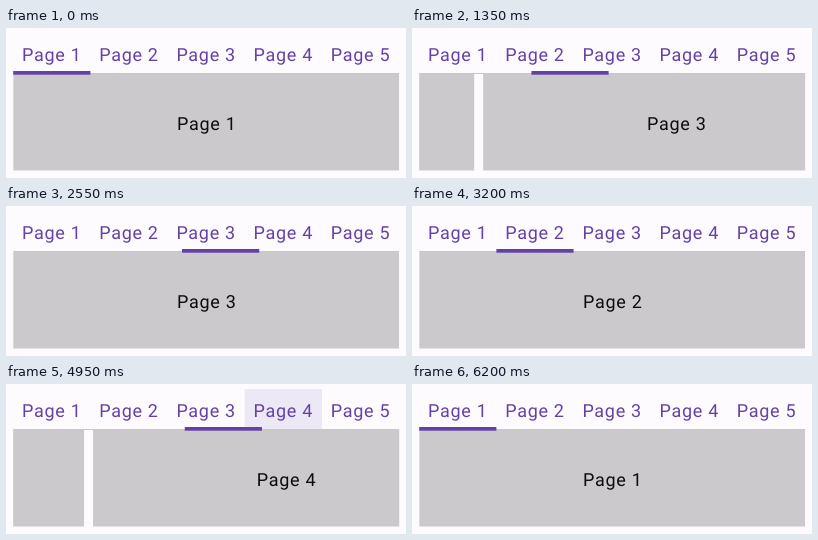
These frames come from a looping animation (400x150 px, 6500 ms). An HTML page:

```html
<!DOCTYPE html>
<html lang="en">
<head>
<meta charset="utf-8">
<title>Tabs with pager</title>
<style>
  html, body { margin: 0; width: 100%; height: 100%; overflow: hidden; background: #fefbff; }
  svg { display: block; }
  text { font: 18px Roboto, sans-serif; letter-spacing: .7px; text-rendering: geometricPrecision; }
  .tab { fill: #6442a5; }
  .label { fill: #0c0c0e; }
</style>
</head>
<body>
<svg width="400" height="150" viewBox="0 0 400 150">
  <clipPath id="tabClip"><rect id="tabBox" y="5" width="77.2" height="41"/></clipPath>
  <circle id="ripple" fill="#6442a5" clip-path="url(#tabClip)"/>
  <g id="tabs"></g>
  <rect x="7.2" y="45" width="386" height="1" fill="#c9c5cc"/>
  <svg x="7.2" y="46" width="386" height="96.6"><g id="pages"></g></svg>
  <rect id="bar" y="43" width="77.2" height="3.7" fill="#6442a5"/>
</svg>
<script>
const LOOP = 6500, LEFT = 7.2, TAB = 77.2, WIDTH = 386, STEP = 395;
const $ = id => document.getElementById(id);

// Scrolls: start, target page, duration (0 = spring)
const scrolls = [
  [545, 1, 460], [1095, 2, 460], [1695, 3, 460], [2293, 2, 255], [2790, 1, 165],
  [4052, 2, 0], [4802, 3, 0], [5745, 0, 0]
];
// Indicator: start, target tab
const slides = [
  [718, 1], [1268, 2], [1868, 3], [2418, 2], [2910, 1],
  [4140, 2], [4890, 3], [5784, 2], [5832, 1], [5912, 0]
];
// Presses: start, tab
const presses = [[3938, 2], [4688, 3], [5636, 0]];

const clamp = v => Math.min(1, Math.max(0, v));

// cubic-bezier(.4, 0, .2, 1)
function ease(x) {
  if (x <= 0) return 0;
  if (x >= 1) return 1;
  let lo = 0, hi = 1;
  for (let i = 0; i < 20; i++) {
    const u = (lo + hi) / 2, v = 1 - u;
    if (1.2 * v * v * u + .6 * v * u * u + u ** 3 < x) lo = u; else hi = u;
  }
  return lo * lo * (3 - 2 * lo);
}

// Critically damped spring, stiffness 400
function spring(ms, distance) {
  const x = ms * .02, rest = (1 + x) * Math.exp(-x);
  return rest * distance < 1.5 ? 1 : 1 - rest;
}

function scrollAt(t) {
  let page = 0;
  for (const [start, to, dur] of scrolls) {
    if (t < start) break;
    const p = dur ? ease((t - start) / dur) : spring(t - start, Math.abs(to - page) * STEP);
    page += (to - page) * p;
  }
  return page;
}

// A new target takes over from wherever the bar is
function barAt(t) {
  let pos = 0;
  slides.forEach(([start, to], i) => {
    if (t < start) return;
    const end = i + 1 < slides.length ? Math.min(t, slides[i + 1][0]) : t;
    pos += (to - pos) * ease((end - start) / 250);
  });
  return pos;
}

function drawRipple(t) {
  const press = presses.find(([start]) => t >= start && t < start + 375);
  let alpha = 0;
  if (press) {
    const age = t - press[0], move = clamp(age / 225), x = LEFT + TAB * press[1];
    alpha = .14 * clamp(age / 75) * clamp((375 - age) / 150);
    $("tabBox").setAttribute("x", x);
    $("ripple").setAttribute("cx", x + TAB / 2 - 3 * (1 - move));
    $("ripple").setAttribute("cy", 8 + 17.5 * move);
    $("ripple").setAttribute("r", 23 + 32 * ease(move));
  }
  $("ripple").setAttribute("opacity", alpha);
}

for (let i = 0; i < 5; i++) {
  const name = "Page " + (i + 1);
  $("tabs").innerHTML += `<text class="tab" x="${16 + TAB * i}" y="33">${name}</text>`;
  $("pages").innerHTML += `<g transform="translate(${STEP * i})">
    <rect width="${WIDTH}" height="97" fill="#cbc9cb"/>
    <text class="label" x="163.8" y="56">${name}</text></g>`;
}

function draw() {
  const t = performance.now() % LOOP;
  $("pages").setAttribute("transform", `translate(${-STEP * scrollAt(t)})`);
  $("bar").setAttribute("x", LEFT + TAB * barAt(t));
  drawRipple(t);
  requestAnimationFrame(draw);
}
draw();
</script>
</body>
</html>
```
